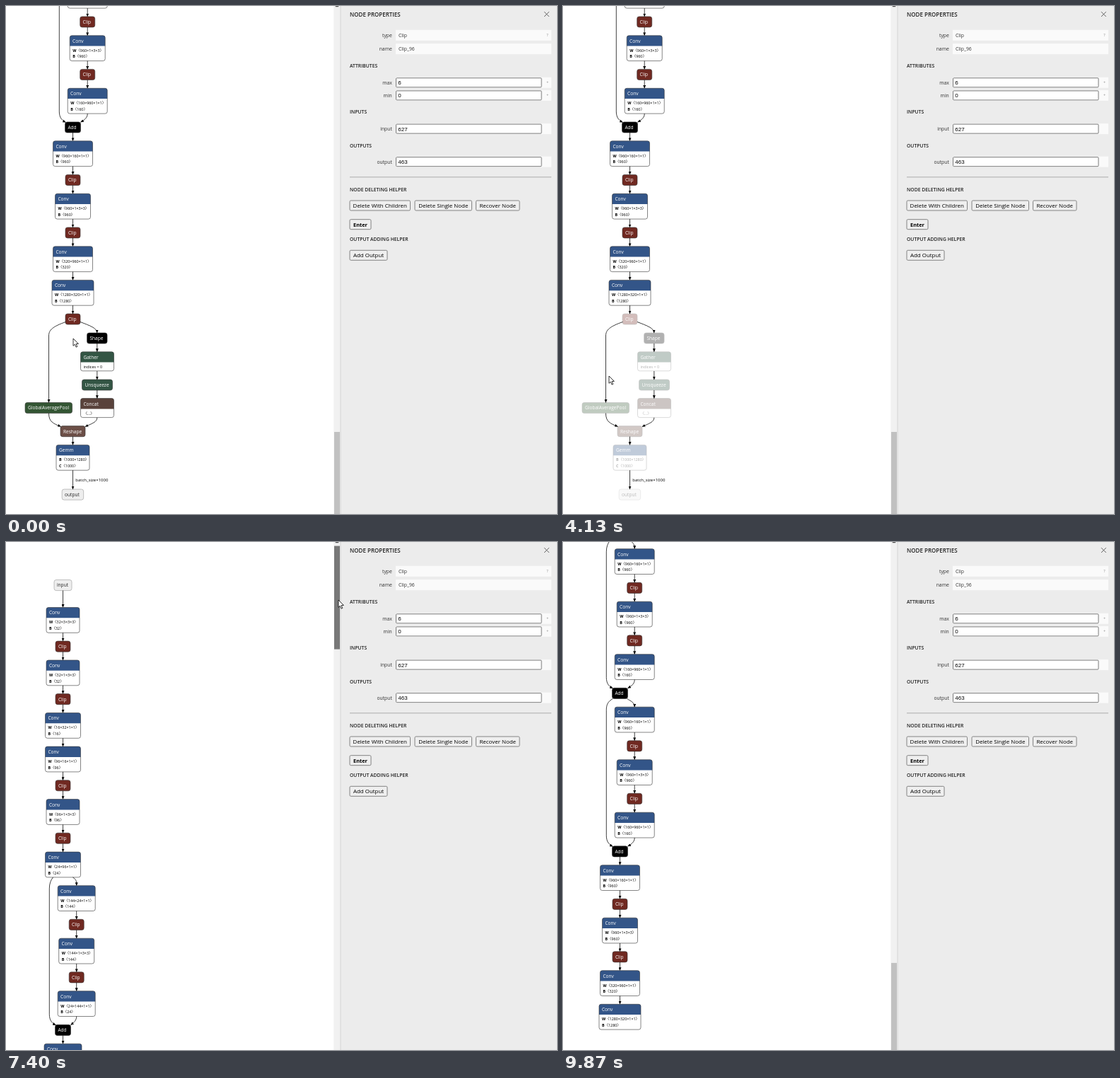
Write an HTML page that moves like this. It is 779 by 718 pixels and loops after 9.94 s.

```html
<!DOCTYPE html>
<html lang="en">
<head>
<meta charset="utf-8">
<title>Node deleting helper</title>
<style>
  html, body { margin: 0; height: 100%; overflow: hidden; background: #fff; }
  svg { display: block; width: 779px; height: 718px; }
  text { font: 6.8px "Open Sans", "Noto Sans", "Noto Sans CJK JP", "Noto Sans CJK", sans-serif; white-space: pre; }
  .title { font-size: 6.6px; }
  .attr { font-size: 5.4px; }
  .edge-label { font-size: 6px; }
  .bold { font-weight: 700; }
  .heading { font-weight: 600; fill: #222; }
  .button { font-size: 7.95px; }
  .field { font: 8px "Liberation Sans", Arial, sans-serif; }
  .edge { fill: none; stroke: #000; stroke-width: .75; marker-end: url(#arrow); }
</style>
</head>
<body>
<svg id="stage" viewBox="0 0 779 718">
  <defs>
    <marker id="arrow" markerUnits="userSpaceOnUse" markerWidth="5" markerHeight="4" refX="4.4" refY="2" orient="auto">
      <path d="M0 0L4.6 2L0 4z"/>
    </marker>
  </defs>
</svg>
<script>
const LOOP = 9940, FPS = 15;
const CONV_H = 35.8, OP_H = 15.1, GAP = 11.8, MAIN_X = 80.5, SKIP_X = 61.3;
const BLUE = '#335588', RED = '#702921', GREEN = '#335544';
const stage = document.getElementById('stage');

function el(tag, attrs, parent = stage, content) {
  const node = document.createElementNS('http://www.w3.org/2000/svg', tag);
  for (const key in attrs) node.setAttribute(key, attrs[key]);
  if (content !== undefined) node.textContent = content;
  return parent.appendChild(node);
}
const group = parent => el('g', {}, parent);
const label = (parent, x, y, content, cls = '', fill = '#000', anchor = 'start') =>
  el('text', { x, y, class: cls, fill, 'text-anchor': anchor }, parent, content);
const rect = (parent, x, y, width, height, fill, more = {}) =>
  el('rect', { x, y, width, height, fill, ...more }, parent);
const edge = (parent, d) => el('path', { d, class: 'edge' }, parent);

// Graph nodes: a plain operator, or a header with attribute lines below it.
function drawNode(parent, cx, top, width, title, color, lines = [], height = OP_H) {
  const x = cx - width / 2, head = lines.length ? 14.8 : height;
  rect(parent, x, top, width, height, lines.length ? '#fff' : color, { rx: 3 });
  if (lines.length)
    el('path', { d: `M${x} ${top + head}v${3 - head}q0-3 3-3h${width - 6}q3 0 3 3v${head - 3}z`, fill: color }, parent);
  const light = color === '#eee';
  rect(parent, x, top, width, height, 'none', { rx: 3, stroke: light ? '#999' : '#333', 'stroke-width': .6 });
  label(parent, x + 3.9, top + 9.9, title, 'title', light ? '#222' : '#fff');
  lines.forEach(([name, value], i) => {
    const line = label(parent, x + 4, top + 22.9 + i * 8.8, '', 'attr');
    el('tspan', { class: 'bold' }, line, name);
    el('tspan', {}, line, value);
  });
}
const shape = dims => '〈' + dims.join('×') + '〉';
const convWidth = dims => 32 + 3 * dims.join('').length;

function buildNetwork(parent) {
  let y = 56.5, last;
  const connect = x => { if (last) edge(parent, `M${x} ${last.bottom}V${y}`); };
  function place(height, extra = 0) {
    last = { bottom: y + height, height };
    y += height + GAP + extra;
  }
  function conv(x, linked, ...dims) {
    if (linked) connect(x);
    drawNode(parent, x, y, convWidth(dims), 'Conv', BLUE,
      [['W', shape(dims)], ['B', shape([dims[0]])]], CONV_H);
    place(CONV_H);
  }
  function op(x, title, width, color, linked = true) {
    if (linked) connect(x);
    drawNode(parent, x, y, width, title, color);
    place(OP_H);
  }
  const clip = x => op(x, 'Clip', 21, RED);

  drawNode(parent, MAIN_X, y, 25, 'input', '#eee');
  place(OP_H, 12.1);
  conv(MAIN_X, true, 32, 3, 3, 3);
  clip(MAIN_X);
  conv(MAIN_X, true, 32, 1, 3, 3);
  clip(MAIN_X);
  conv(MAIN_X, true, 16, 32, 1, 1);

  let channels = 16;
  for (const [out, repeats] of [[24, 2], [32, 3], [64, 4], [96, 3], [160, 3], [320, 1]]) {
    for (let i = 0; i < repeats; i++) {
      const hidden = channels * 6, residual = i > 0, fork = last;
      const x = residual ? 73.2 + convWidth([hidden, channels, 1, 1]) / 2 : MAIN_X;
      const b = fork.bottom, reach = fork.height > 20 ? 14 : 10;
      if (residual)
        edge(parent, `M${MAIN_X + reach} ${b}C${MAIN_X + reach + 5} ${b + 3.5} ${x} ${b + 5} ${x} ${y}`);
      conv(x, !residual, hidden, channels, 1, 1);
      clip(x);
      conv(x, true, hidden, 1, 3, 3);
      clip(x);
      conv(x, true, out, hidden, 1, 1);
      if (residual) {
        edge(parent, `M${MAIN_X - reach} ${b}C${SKIP_X + 2} ${b + 4} ${SKIP_X} ${b + 9} ${SKIP_X} ${b + 16}` +
          `V${y - 15}C${SKIP_X} ${y - 6} ${SKIP_X + 4} ${y - 2} ${MAIN_X - 10} ${y + .5}`);
        edge(parent, `M${x} ${last.bottom}C${x} ${y - 6} ${x - 4} ${y - 3} ${MAIN_X + 11} ${y + .3}`);
        op(MAIN_X, 'Add', 22, '#000', false);
      }
      channels = out;
    }
  }
  conv(MAIN_X, true, 1280, 320, 1, 1);
}

function buildTail(edges, nodes) {
  ['M94.5 423.2V435', 'M84.5 446.5C66 453 60.5 458 60.5 466V560.5', 'M105 446.5C119 452 128.5 455 128.8 462',
    'M128.8 477V488.7', 'M128.8 516V528', 'M128.8 543V554.6', 'M60.5 575.6C60.5 588 67 590 77.5 594.5',
    'M128.8 581.8C128.8 588 122 590 112 594.5', 'M94.5 608.6V620.4', 'M94.5 656.2V683'
  ].forEach(d => edge(edges, d));
  label(edges, 98.3, 671.6, 'batch_size×1000', 'edge-label');
  drawNode(nodes, 94.5, 435, 21, 'Clip', RED);
  drawNode(nodes, 128.8, 462, 28.5, 'Shape', '#000');
  drawNode(nodes, 129, 488.8, 47, 'Gather', GREEN, [['', 'indices = 0']], 27);
  drawNode(nodes, 129, 528, 43, 'Unsqueeze', GREEN);
  drawNode(nodes, 129, 554.6, 47, 'Concat', '#59423b', [['', '〈...〉']], 27);
  drawNode(nodes, 60.3, 560.5, 66.5, 'GlobalAveragePool', '#335533');
  drawNode(nodes, 94.5, 593.6, 35, 'Reshape', '#6c4f47');
  drawNode(nodes, 94.5, 620.4, 47, 'Gemm', BLUE, [['B', shape([1000, 1280])], ['C', shape([1000])]], CONV_H);
  drawNode(nodes, 94.4, 683, 30.5, 'output', '#eee');
}

function buildPanel(parent) {
  rect(parent, 473, 0, 306, 718, '#ececec');
  rect(parent, 472.6, 0, .8, 718, '#d0d0d0');
  label(parent, 486, 15, 'NODE PROPERTIES', 'heading').style.fontSize = '8px';
  el('path', { d: 'M761 8.2l6.8 6.8m0-6.8l-6.8 6.8', stroke: '#555', 'stroke-width': .9 }, parent);
  for (const [y, text] of [[84.5, 'ATTRIBUTES'], [149.5, 'INPUTS'], [197, 'OUTPUTS'],
    [259.5, 'NODE DELETING HELPER'], [329.5, 'OUTPUT ADDING HELPER']])
    label(parent, 486, y + 2.5, text, 'heading');

  function row(y, name, value, editable, hint) {
    label(parent, 545.8, y + 2.5, name, '', '#333', 'end');
    rect(parent, 551, y - 7.5, 220, 15, '#fafafa');
    if (editable)
      rect(parent, 551.5, y - 6.5, 205.5, 13, '#fff', { rx: 1, stroke: '#6c6c6c', 'stroke-width': .9 });
    label(parent, editable ? 554.3 : 555, y + (editable ? 3 : 2.6), value, editable ? 'field' : '', editable ? '#000' : '#333');
    if (hint) label(parent, 765.5, y + 2, hint, 'attr', '#888', 'middle');
  }
  row(41.3, 'type', 'Clip', false, '?');
  row(60.6, 'name', 'Clip_96');
  row(108.3, 'max', '6', true, '+');
  row(126.4, 'min', '0', true, '+');
  row(173.6, 'input', '627', true);
  row(220.2, 'output', '463', true);
  rect(parent, 486, 241.4, 285, .9, '#a5a5a5');

  return [[486, 275, 85.5, 'Delete With Children', 3130], [578, 275, 80.5, 'Delete Single Node'],
    [664.5, 275, 61.5, 'Recover Node'], [486, 301.7, 30, 'Enter', 5470], [486, 345.3, 53, 'Add Output']
  ].map(([x, y, width, text, pressedAt]) => {
    const box = rect(parent, x, y, width, 14, '#efefef', { rx: 1.6, 'stroke-width': .9 });
    const caption = label(parent, x + width / 2, y + 9.9, text, 'button', '#000', 'middle');
    if (text === 'Enter') caption.setAttribute('style', 'font-weight:700;font-size:7.4px');
    return { box, x, y, width, pressedAt };
  });
}

const network = group(), tail = group(), tailNodes = group(tail);
buildNetwork(network);
buildTail(tail, tailNodes);
rect(stage, 463.3, 0, 9.7, 718, '#f1f1f1');
el('path', { d: 'M465.8 0h4.4v1.2h-4.4z', fill: '#505050' });
const thumb = rect(stage, 464, 0, 8, 146, '#c1c1c1');
const buttons = buildPanel(group());
const cursor = el('path', { d: 'M0 0V10.3L2.4 8.2L4.1 12.2L5.8 11.4L4.1 7.6L7.4 7.4z',
  fill: '#fff', stroke: '#000', 'stroke-width': .8, 'stroke-linejoin': 'round' });

// Keyframes: time in ms, then the values at that time.
const CURSOR = [
  [0, 95, 470], [200, 97, 475], [400, 74, 460], [667, 86, 437], [1067, 86, 437],
  [1400, 200, 492], [1667, 400, 470], [1933, 588, 360], [2067, 578, 323], [2333, 532, 283],
  [3333, 532, 283], [3533, 577, 300], [3733, 400, 400], [4000, 54, 510], [4133, 65, 523],
  [4467, 65, 523], [4800, 300, 450], [5000, 542, 350], [5133, 503, 308], [5533, 503, 308],
  [5667, 522, 345], [6000, 290, 565], [6400, 290, 565], [6467, 289, 565], [6800, 400, 300],
  [7000, 478, 100], [7133, 470, 82], [7400, 470, 82], [7467, 540, 220], [7533, 636, 420],
  [7600, 560, 600], [7667, 458, 680], [7733, 448, 700], [7867, 440, 695], [8133, 180, 650],
  [8333, 38, 625], [8533, 60, 580], [8733, 119, 620], [8933, 80, 686], [9133, 33, 650],
  [9333, 100, 687], [9400, 114, 690], [9467, 88, 688], [9600, 88, 688], [9667, 63, 673],
  [9733, 200, 680], [9800, 474, 690]
];
const SCROLL = [[7333, 0], [7400, 3], [7467, 560], [7533, 1450], [7600, 2350], [7667, 2992], [7733, 3053.4]];

function sample(keys, time) {
  const i = keys.findIndex(key => key[0] > time);
  if (i === 0) return keys[0].slice(1);
  if (i < 0) return keys[keys.length - 1].slice(1);
  const a = keys[i - 1], b = keys[i], k = (time - a[0]) / (b[0] - a[0]);
  return a.slice(1).map((v, n) => v + (b[n + 1] - v) * k);
}

function render(now) {
  const time = Math.round(Math.floor((now % LOOP + 5) * FPS / 1000) * 1000 / FPS);
  const pruned = time >= 5533, [x, y] = sample(CURSOR, time), [scroll] = sample(SCROLL, time);

  network.setAttribute('transform', pruned ? `translate(0 ${-scroll})` : 'translate(14 -3319.3)');
  tail.setAttribute('display', pruned ? 'none' : 'inline');
  tailNodes.setAttribute('opacity', time >= 3200 ? .3 : 1);

  const thumbY = pruned ? 5 + scroll * .1932 : 602, dragging = time >= 7333 && time < 7867;
  const overThumb = x >= 464 && x < 472 && y >= thumbY && y < thumbY + 146;
  thumb.setAttribute('y', thumbY);
  thumb.setAttribute('fill', dragging ? '#787878' : overThumb && time < 9860 ? '#a8a8a8' : '#c1c1c1');

  for (const b of buttons) {
    const over = x >= b.x && x < b.x + b.width && y >= b.y && y < b.y + 14;
    const pressed = time >= b.pressedAt - 5 && time < b.pressedAt + 60;
    b.box.setAttribute('fill', pressed ? '#f5f5f5' : over ? '#e0e0e0' : '#efefef');
    b.box.setAttribute('stroke', over ? '#444' : '#767676');
  }
  cursor.setAttribute('transform', `translate(${x} ${y})`);
  cursor.setAttribute('display', time >= 9860 ? 'none' : 'inline');
}

const start = performance.now();
function tick() {
  render(performance.now() - start);
  requestAnimationFrame(tick);
}
tick();
</script>
</body>
</html>
```
